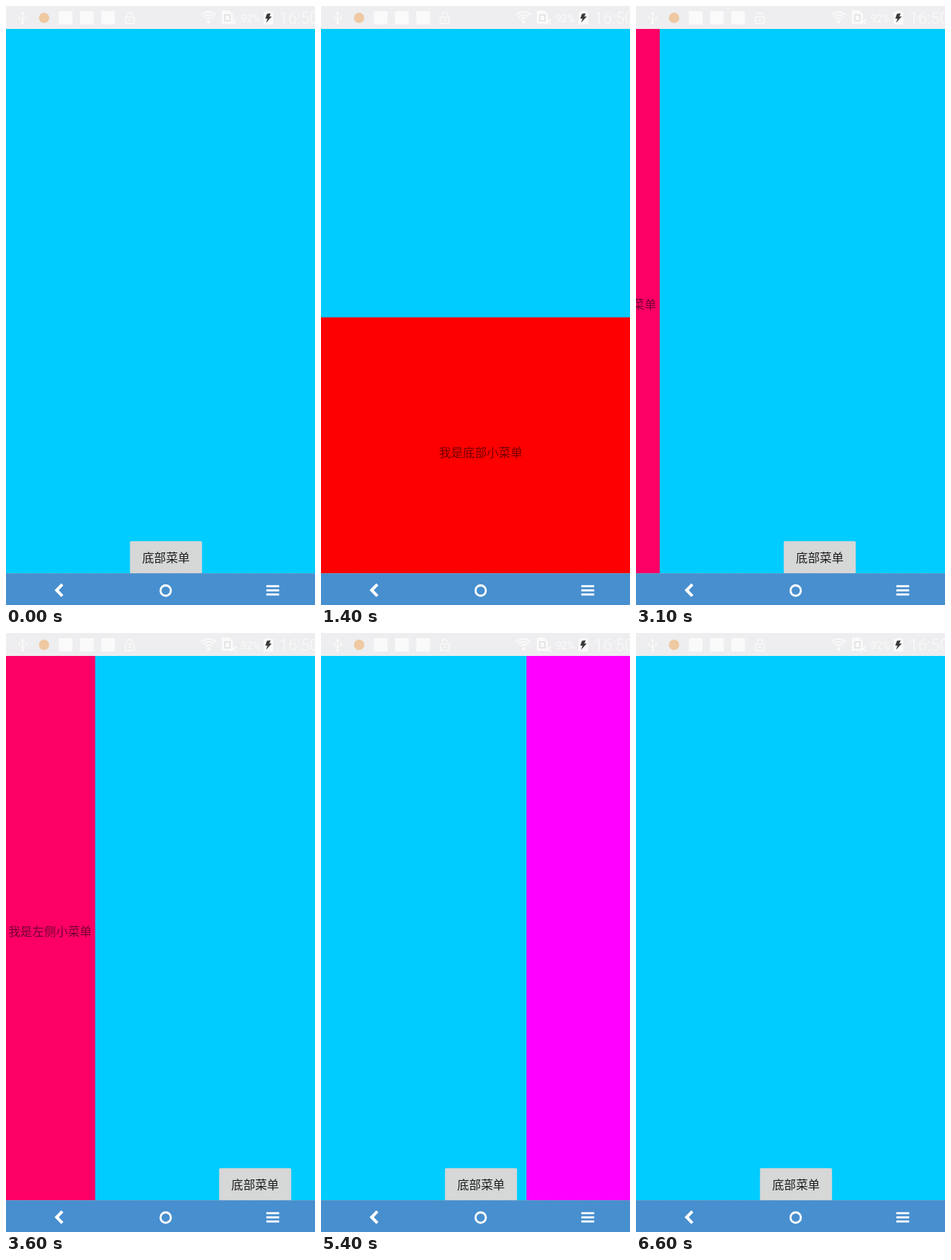
These frames come from a looping animation (418 px wide and 809 px high, 8 s). An HTML page with a canvas:

```html
<!DOCTYPE html>
<html lang="zh-CN">
<head>
<meta charset="utf-8">
<title>滑动菜单</title>
<style>
html, body { margin: 0; width: 100%; height: 100%; overflow: hidden; background: #00ccff; }
canvas { display: block; width: 418px; height: 809px; }
</style>
</head>
<body>
<canvas id="stage" width="418" height="809"></canvas>
<script>
const ctx = document.getElementById('stage').getContext('2d');
const W = 418, H = 809, LOOP = 8000, STEP = 100;
const TOP = 31, FLOOR = 766;
const CJK = '16.1px "Noto Sans CJK SC", "Noto Sans CJK", sans-serif';
const HINT = 'rgba(0,0,0,.54)';

// Start times in ms, lengths in steps; drag is the power of the opening ease.
const menus = {
  bottom: { size: 355.5, drag: 1.26, open: 500, openSteps: 6, close: 1400, closeSteps: 7 },
  left: { size: 120.6, drag: 1.7, open: 3100, openSteps: 6, close: 4300, closeSteps: 5 },
  right: { size: 234, drag: 2.25, open: 5200, openSteps: 9, close: 6200, closeSteps: 5 }
};

const easeOut = (p, k) => 1 - (1 - p) ** k;
const easeInOut = (p, k) => p < 0.5 ? (2 * p) ** k / 2 : 1 - (2 - 2 * p) ** k / 2;

function progress(t, start, steps) {
  const done = Math.floor((t - start) / STEP) + 1;
  return Math.min(1, Math.max(0, done / steps));
}

function extent(menu, t) {
  const opened = easeOut(progress(t, menu.open, menu.openSteps), menu.drag);
  const closed = easeInOut(progress(t, menu.close, menu.closeSteps), 2.3);
  return menu.size * opened * (1 - closed);
}

function rect(x, y, w, h, color) {
  ctx.fillStyle = color;
  ctx.fillRect(x, y, w, h);
}

function trace(points) {
  ctx.beginPath();
  points.forEach(([x, y]) => ctx.lineTo(x, y));
}

function line(points, color, width) {
  ctx.strokeStyle = color;
  ctx.lineWidth = width;
  trace(points);
  ctx.stroke();
}

function shape(points, color) {
  ctx.fillStyle = color;
  trace(points);
  ctx.fill();
}

function disc(x, y, r, color) {
  ctx.fillStyle = color;
  ctx.beginPath();
  ctx.arc(x, y, r, 0, Math.PI * 2);
  ctx.fill();
}

function arc(x, y, r, from, to, color, width) {
  ctx.strokeStyle = color;
  ctx.lineWidth = width;
  ctx.beginPath();
  ctx.arc(x, y, r, from, to);
  ctx.stroke();
}

function label(text, x, y, color, font = CJK, align = 'center') {
  ctx.font = font;
  ctx.textAlign = align;
  ctx.fillStyle = color;
  ctx.fillText(text, x, y);
}

function drawButton(shift) {
  const x = 167.7 + shift;
  ctx.fillStyle = '#d6d7d7';
  ctx.beginPath();
  ctx.roundRect(x, 722.8, 97.5, 44, 2);
  ctx.fill();
  label('底部菜单', x + 48.7, 751, '#1c1c1c');
}

function drawStatusBar() {
  const ink = '#fafafa';
  rect(0, 0, W, TOP, '#eeeef0');

  // USB
  line([[22.5, 9], [22.5, 24]], ink, 1.5);
  line([[17.5, 13], [17.5, 16], [22.5, 20], [27.5, 16], [27.5, 13]], ink, 1.3);
  shape([[20, 11], [22.5, 7], [25, 11]], ink);
  disc(22.5, 23, 2, ink);

  disc(51.5, 16, 7, '#efc9a2');
  for (let i = 0; i < 3; i++) rect(71.5 + i * 28.7, 7, 18.5, 18, ink);

  // Padlock
  ctx.strokeStyle = ink;
  ctx.lineWidth = 1.5;
  ctx.strokeRect(161.5, 15, 12, 8.5);
  arc(167.5, 12.5, 3.8, Math.PI, 0, ink, 1.5);
  rect(166, 18, 3, 2, ink);

  // Wi-Fi
  for (let r = 5; r <= 13; r += 4) arc(274, 21, r, -Math.PI * 0.77, -Math.PI * 0.23, ink, 2);
  disc(274, 21.5, 2.2, ink);

  // SIM card
  shape([[292, 6], [302, 6], [307, 11], [307, 24], [292, 24]], ink);
  ctx.strokeStyle = '#e6e6e8';
  ctx.strokeRect(296, 12, 7, 8);
  line([[304, 18], [311, 25]], ink, 1.8);
  line([[311, 18], [304, 25]], ink, 1.8);

  label('92%', 317.5, 21.5, ink, '14px Roboto, sans-serif', 'left');

  // Battery
  rect(348.5, 8, 13, 17, ink);
  rect(352, 6.5, 6, 2, ink);
  shape([[353, 10.5], [358, 10], [356.2, 14.2], [359.5, 14.2], [351.8, 22.5], [353.8, 17], [350.8, 17]], '#383838');

  label('16:50', 369.5, 24, ink, '300 22px Roboto, sans-serif', 'left');
}

function drawNavBar() {
  rect(0, FLOOR, W, H - FLOOR, '#478fcf');
  ctx.setLineDash([2, 1]);
  line([[0, FLOOR + 0.5], [W, FLOOR + 0.5]], 'rgba(150,175,190,.5)', 1);
  ctx.setLineDash([]);
  line([[76.2, 781.2], [68.5, 789], [76.2, 796.8]], '#fff', 4);
  arc(216, 789.5, 7, 0, Math.PI * 2, '#fff', 2.8);
  for (let i = 0; i < 3; i++) rect(352.2, 782.2 + i * 5.6, 17.3, 2.8, '#fff');
}

function draw(t) {
  const bottom = extent(menus.bottom, t);
  const left = extent(menus.left, t);
  const right = extent(menus.right, t);

  rect(0, 0, W, H, '#00ccff');
  drawButton(left);
  rect(0, TOP, left, FLOOR - TOP, '#fd0066');
  label('我是左侧小菜单', left - 61, 409, left ? HINT : 'transparent');
  rect(W - right, TOP, right, FLOOR - TOP, '#ff00ff');
  if (bottom) {
    const y = FLOOR - bottom;
    rect(0, y, W, bottom, '#fd0000');
    label('我是底部小菜单', 216.2, y + 188.5, HINT);
  }
  drawStatusBar();
  drawNavBar();
}

const began = performance.now();
function tick() {
  draw((performance.now() - began) % LOOP);
  requestAnimationFrame(tick);
}
tick();
</script>
</body>
</html>
```
